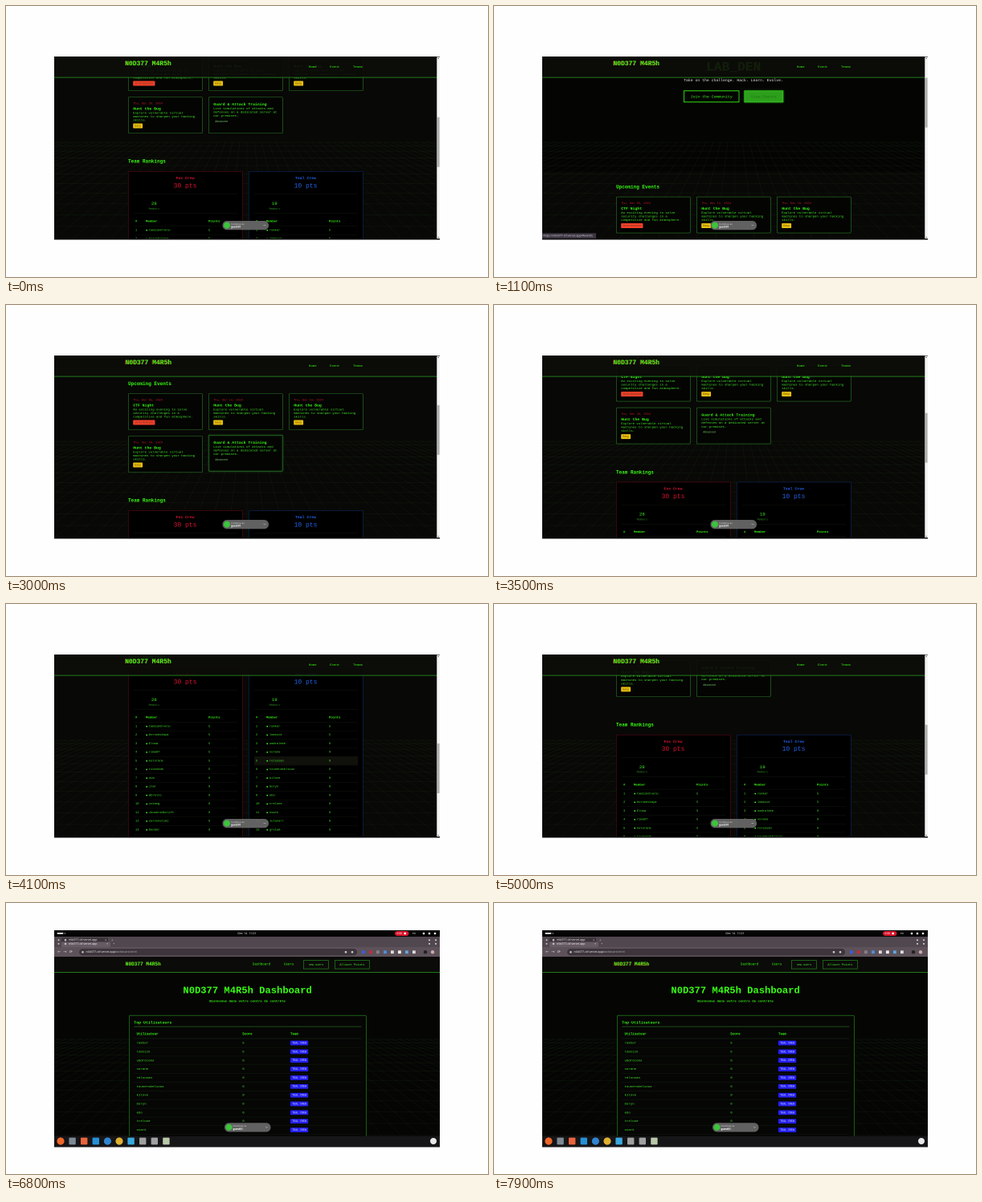
Animation of 600x338 px, one loop 8 s. Source, as an HTML page with a canvas:

```html
<!DOCTYPE html>
<html lang="en">
<head>
<meta charset="utf-8">
<title>Event page and dashboard</title>
<style>
html, body { margin: 0; width: 100%; height: 100%; overflow: hidden; background: #fefefe; }
canvas { display: block; width: 600px; height: 338px; }
</style>
</head>
<body>
<canvas id="stage"></canvas>
<script>
const LOOP = 8000, CUT = 6500;
const GREEN = '#39ff14', SOFT = '#45f02c', EDGE = '#2a7a28', BAR = '#289420';
const RED = '#dc1432', BLUE = '#2563eb';
const MONO = '"Liberation Mono", monospace', SANS = '"Noto Sans", sans-serif';
const BRAND = 'N0D377 M4R5h', SITE = 'n0d377-ctf.vercel.app';

const canvas = document.getElementById('stage');
const ctx = canvas.getContext('2d');
// Twice the screen density keeps the tiny type in shape.
const ratio = 2 * (window.devicePixelRatio || 1);
canvas.width = 600 * ratio;
canvas.height = 338 * ratio;

const hunt = ['Hunt the Bug', 'Explore vulnerable virtual', 'machines to sharpen your hacking', 'skills.'];
const cards = [
  { x: 152, y: 319.5, date: 'Thu, Dec 05, 2024', level: 'Intermediate', color: '#f5402c',
    lines: ['CTF Night', 'An exciting evening to solve', 'security challenges in a', 'competitive and fun atmosphere.'] },
  { x: 252, y: 319.5, date: 'Thu, Dec 12, 2024', level: 'Easy', color: '#e8c010', lines: hunt, hover: [1850, 2500] },
  { x: 352, y: 319.5, date: 'Thu, Dec 19, 2024', level: 'Easy', color: '#e8c010', lines: hunt },
  { x: 152, y: 372.5, date: 'Thu, Dec 26, 2024', level: 'Easy', color: '#e8c010', lines: hunt },
  { x: 252, y: 372.5, level: 'Advanced', hover: [2700, 3300],
    lines: ['Guard & Attack Training', 'Live simulations of attacks and', 'defenses on a dedicated server at', 'our premises.'] }
];
const teams = [
  { x: 152, name: 'Fox Crew', points: 30, size: 28, color: RED, edge: 'rgba(220,20,50,.4)',
    members: 'tamsik0rvelo borundikaya Elnow rima07 kelorane tivounda zub ilar mbrelto votang Jauneredkolift sarounelimi Dandor'.split(' ') },
  { x: 302, name: 'Teal Crew', points: 10, size: 19, color: BLUE, edge: 'rgba(37,99,235,.4)',
    members: 'rakker lomsick umdraleke vorane relsosan tounerakeliouz kilove boryn ebo trelone osark lulavarr grviam'.split(' ') }
];

// [time, scroll offset]
const scrollKeys = [[0, 259], [650, 0], [920, 0], [1298, 174], [2600, 174], [2950, 209],
  [3300, 209], [4000, 386], [4700, 386], [5700, 0], [LOOP, 0]];

const clamp = v => Math.min(1, Math.max(0, v));
const smooth = v => v * v * (3 - 2 * v);

function scrollAt(t) {
  const i = scrollKeys.findIndex(k => t < k[0]);
  const [t0, a] = scrollKeys[i - 1], [t1, b] = scrollKeys[i];
  return a + (b - a) * smooth((t - t0) / (t1 - t0));
}

const hoverAt = (t, [from, to]) => clamp((t - from) / 200) * clamp((to + 200 - t) / 200);

function rect(x, y, w, h, color) {
  ctx.fillStyle = color;
  ctx.fillRect(x, y, w, h);
}

function box(x, y, w, h, { r = 0, fill, stroke, width = .6, glow = 0 }) {
  ctx.save();
  ctx.beginPath();
  ctx.roundRect(x, y, w, h, r);
  if (fill) { ctx.fillStyle = fill; ctx.fill(); }
  if (stroke) {
    ctx.shadowColor = stroke;
    ctx.shadowBlur = glow * ratio;
    ctx.strokeStyle = stroke;
    ctx.lineWidth = width;
    ctx.stroke();
  }
  ctx.restore();
}

function dot(x, y, r, color) {
  box(x - r, y - r, 2 * r, 2 * r, { r, fill: color });
}

// Type is set large and scaled down so that small sizes keep exact advances.
function text(str, x, y, size, color, { bold, align = 'left', font = MONO } = {}) {
  ctx.save();
  ctx.translate(x, y);
  ctx.scale(.05, .05);
  ctx.font = `${bold ? 'bold ' : ''}${size * 20}px ${font}`;
  ctx.textAlign = align;
  ctx.textBaseline = 'middle';
  ctx.fillStyle = color;
  ctx.fillText(str, 0, 0);
  ctx.restore();
}

const bold = { bold: true }, mid = { align: 'center' }, boldMid = { bold: true, align: 'center' };

function glitch(str, x, y, size, t, align = 'left') {
  const shift = [0, .3, -.2, .4][Math.floor(t / 200) % 4];
  text(str, x - .6, y + shift / 2, size, 'rgba(220,30,50,.6)', { bold: true, align });
  text(str, x + shift, y, size, GREEN, { bold: true, align });
}

function clip(x, y, w, h, draw) {
  ctx.save();
  ctx.beginPath();
  ctx.rect(x, y, w, h);
  ctx.clip();
  draw();
  ctx.restore();
}

function grid(top, bottom) {
  ctx.strokeStyle = 'rgba(80,180,70,.11)';
  ctx.lineWidth = .5;
  ctx.beginPath();
  for (let i = -30; i <= 30; i++) {
    ctx.moveTo(300 + i * 9, top);
    ctx.lineTo(300 + i * 24, bottom);
  }
  for (let i = 0; i < 12; i++) {
    const y = top + (bottom - top) * (i / 11) ** 1.4;
    ctx.moveTo(60, y);
    ctx.lineTo(540, y);
  }
  ctx.stroke();
}

function hero(t) {
  glitch('LAB_DEN', 298, 158, 16.2, t, 'center');
  text('Take on the challenge. Hack. Learn. Evolve.', 298, 174, 4.8, '#f0f0f0', mid);
  box(236.5, 187.3, 68.5, 14, { stroke: GREEN, width: .8 });
  text('Join the Community', 270.7, 194.5, 4.8, GREEN, mid);
  const h = hoverAt(t, [700, 1250]);
  box(311.8, 187.3, 48, 14, { stroke: GREEN, width: .8 });
  if (h) {
    ctx.globalAlpha = h;
    box(311.8, 187.3, 48, 14, { fill: '#2c9e1c', stroke: '#36c822', glow: 2.5 });
    ctx.globalAlpha = 1;
  }
  text('View Events', 335.8, 194.5, 4.8, h > .5 ? '#1c7a10' : GREEN, mid);
}

function eventCard(card, t) {
  const h = card.hover ? hoverAt(t, card.hover) : 0;
  const x = card.x + 6.2, y = card.y - 1.2 * h;
  box(card.x + .3, y, 92, 45, { r: 1, fill: '#040403', stroke: EDGE, glow: 2 * h });
  const top = card.date ? y + 14.7 : y + 9.3;
  if (card.date) text(card.date, x, y + 8, 3.6, '#c0182c');
  card.lines.forEach((line, i) => i
    ? text(line, x, top + .5 + i * 4.6, 4, SOFT)
    : text(line, x, top, 4.8, GREEN, bold));
  const width = card.level.length * 1.92 + 4.2;
  if (card.color) box(x, top + 18.3, width, 6, { r: .8, fill: card.color });
  text(card.level, x + 2.2, top + 21.4, 3.2, card.color ? '#5a3a10' : '#7fd070');
}

function teamCard(team, scroll) {
  const { x, color } = team, center = x + 71;
  box(x + .4, 465.3, 142, 220, { r: 1, fill: '#000', stroke: team.edge });
  text(team.name, center, 473.7, 4.8, color, boldMid);
  text(team.points + ' pts', center, 483.2, 8, color, mid);
  text(team.size, x + 32.3, 505.5, 5.8, SOFT, mid);
  text('Members', x + 32.3, 512, 3.2, '#2f8a22', mid);
  const line = y => rect(x + 7, y, 129, .4, '#141d12');
  line(493.5);
  line(517.5);
  const columns = [9, 22, 100];
  ['#', 'Member', 'Points'].forEach((s, i) => text(s, x + columns[i], 527.5, 4, GREEN, bold));
  line(533);
  // The pointer rests at the same height while rows pass below it.
  const pointed = color === BLUE && scroll > 330 ? Math.floor((195.5 + scroll - 533) / 10.75) : -1;
  team.members.forEach((name, i) => {
    const y = 538.5 + i * 10.75;
    if (i === pointed) rect(x + 7, y - 5.4, 129, 10.7, '#11110c');
    text(i + 1, x + 9, y, 3.7, SOFT);
    dot(x + 23.2, y + .2, .9, SOFT);
    text(name, x + 26, y, 3.7, SOFT);
    text(i < team.points / 5 ? 5 : 0, x + 100, y, 3.7, SOFT);
    line(y + 5.4);
  });
}

function pill(x, y) {
  box(x, y, 57.5, 11.3, { r: 5.6, fill: 'rgba(106,106,106,.92)' });
  dot(x + 5.5, y + 5.6, 4, '#3cc43c');
  text('Continue as', x + 10.5, y + 3.9, 3, '#ddd', { font: SANS });
  text('guest01', x + 10.5, y + 7.8, 3.1, '#fff', { bold: true, font: SANS });
  rect(x + 51, y + 5.4, 3, .6, '#bbb');
}

function sitePage(t) {
  const scroll = scrollAt(t);
  clip(60, 63, 480, 228.4, () => {
    rect(60, 63, 480, 229, '#080806');
    rect(60, 63, 480, Math.max(0, 288 - scroll - 63), '#040403');
    grid(170, 290);
    ctx.save();
    ctx.translate(0, -scroll);
    hero(t);
    text('Upcoming Events', 152, 307.6, 6, GREEN, bold);
    cards.forEach(card => eventCard(card, t));
    text('Team Rankings', 152, 453.2, 6, GREEN, bold);
    teams.forEach(team => teamCard(team, scroll));
    ctx.restore();

    rect(60, 63, 476.5, 26, 'rgba(12,12,9,.92)');
    rect(60, 88.7, 476.5, .8, BAR);
    glitch(BRAND, 148.2, 72, 8, t);
    [['Home', 377], ['Event', 403.2], ['Teams', 432]].forEach(([s, x]) => text(s, x, 76, 4, GREEN));

    rect(536.3, 63.6, 3.7, 226.4, '#f4f4f4');
    rect(536.8, 67 + scroll * .277, 2.8, 62, '#b0b0b0');
    rect(537.5, 65, 1.4, 1, '#666');
    rect(537.5, 288, 1.4, 1, '#666');
    rect(60, 290, 480, 2, '#080808');
    if (t > 720 && t < 1400) {
      rect(60, 283.3, 67, 6.7, '#3b3340');
      text(`https://${SITE}/#events`, 61.2, 286.6, 3.5, '#ddd', { font: SANS });
    }
  });
  pill(269.5, 268);
}

function browserBars() {
  const sans = { font: SANS };
  rect(60, 34, 480, 8, '#050505');
  box(63.5, 37, 8, 1.8, { r: .9, fill: '#eee' });
  dot(73.4, 37.9, .8, '#888');
  text('Dec 14  11:01', 300, 38, 3.7, '#eee', { font: SANS, align: 'center' });
  box(484, 35, 17.5, 6, { r: 3, fill: '#d9142c' });
  text('0:06', 486.5, 38, 3.2, '#fff', sans);
  rect(495.5, 36.8, 2.4, 2.4, '#fff');
  text('en', 506, 38, 3.4, '#ddd', sans);
  [520, 527, 534].forEach(x => dot(x, 38, 1.3, '#eee'));

  rect(60, 42, 480, 13, '#51474e');
  box(69, 43.5, 58, 5, { r: 1, fill: '#3b3439' });
  box(69, 48.5, 61, 6.5, { r: 1, fill: '#665a63' });
  [46.2, 50.9].forEach((y, i) => {
    dot(65.5, y, 1, '#ccc');
    dot(74, y, 1.3, '#bbb');
    text(SITE, 78, y, 3.5, '#eee', sans);
    text('×', 123 + i * 2, y, 4, '#ddd', sans);
    text('+', 131 + i * 2, y, 4, '#ddd', sans);
    [527, 535].forEach(x => dot(x, y, 1, '#ddd'));
  });

  rect(60, 55, 480, 12, '#5d525a');
  text('←  →  ⟳', 64, 61, 5, '#ddd', { font: '"DejaVu Sans", sans-serif' });
  box(91, 57, 346, 8.4, { r: 4.2, fill: '#3d353b' });
  dot(95.5, 61.2, 1.3, '#bbb');
  text(SITE, 99.5, 61.2, 3.6, '#eee', sans);
  text('/dashboard.html', 134.5, 61.2, 3.6, '#aaa', sans);
  dot(423, 61.2, 1.3, '#ccc');
  dot(431, 61.2, 1.3, '#ccc');
  ['#3b5bdb', '#c92a3a', '#8a7f87', '#4a90e2', '#ddd', '#eee', '#5aa9e6', '#ddd'].forEach((c, i) =>
    rect(443 + i * 9, 59.3, 3.8, 3.8, c));
  dot(522, 61.2, 2.2, '#222');
  dot(531, 61.2, 2.2, '#caa');
}

function dashboard(t) {
  browserBars();
  clip(60, 67, 480, 224, () => {
    rect(60, 67, 480, 224, '#050504');
    grid(170, 290);
    rect(60, 67, 480, 19.3, '#0b0b09');
    rect(60, 86, 480, .8, BAR);
    glitch(BRAND, 149, 76.7, 6.1, t);
    text('Dashboard', 307, 76.2, 4.1, GREEN);
    text('Users', 346, 76.2, 4.1, GREEN);
    box(370.3, 71.6, 31, 10.5, { stroke: BAR });
    text('new users', 386, 76.9, 3.4, SOFT, mid);
    box(409.3, 71.6, 43, 10.5, { stroke: BAR });
    text('Allouer Points', 430.8, 76.9, 3.7, SOFT, mid);
    text(BRAND + ' Dashboard', 300.6, 109.2, 12.15, GREEN, boldMid);
    text('Bienvenue dans votre centre de contrôle', 300.6, 122.7, 4.05, GREEN, boldMid);

    box(153.3, 140.2, 295, 180, { r: 1.5, fill: '#060605', stroke: BAR });
    text('Top Utilisateurs', 159.3, 149.2, 4.9, GREEN, bold);
    rect(159.3, 153.8, 283, .6, '#2a7f1e');
    [['Utilisateur', 162.5], ['Score', 294.3], ['Team', 354]].forEach(([s, x]) => text(s, x, 163.4, 4.1, GREEN, bold));
    rect(159.3, 168.8, 283, .4, '#1c3a17');
    teams[1].members.slice(0, 11).forEach((name, i) => {
      const y = 174.5 + i * 10.85;
      text(name, 162.5, y, 4.05, SOFT);
      text(i < 2 ? 5 : 0, 294.3, y, 4.05, SOFT);
      box(354, y - 2.9, 22.2, 5.9, { r: .8, fill: '#2420f0' });
      text('TEAL CREW', 365.1, y + .1, 3.3, '#d8d8ff', mid);
      rect(159.3, y + 5.4, 283, .4, '#132310');
    });
  });

  rect(60, 290.8, 480, 13.7, '#161517');
  ['#f0662a', '#7d8a94', '#e8643c', '#2490d8', '#2f86d0', '#e0b030', '#38a8e0', '#a0a0a0', '#a0a0a0', '#b8c8a8'].forEach((c, i) => {
    const x = 68 + i * 14.6;
    if ([0, 4, 5].includes(i)) dot(x, 297, 4.6, c);
    else box(x - 4.2, 292.6, 8.4, 8.8, { r: 1, fill: c });
  });
  dot(532, 297, 4, '#e8e8e8');
  pill(272, 274.2);
}

function frame(now) {
  const t = now % LOOP;
  ctx.setTransform(ratio, 0, 0, ratio, 0, 0);
  rect(0, 0, 600, 338, '#fefefe');
  (t < CUT ? sitePage : dashboard)(t);
  requestAnimationFrame(frame);
}
requestAnimationFrame(frame);
</script>
</body>
</html>
```
